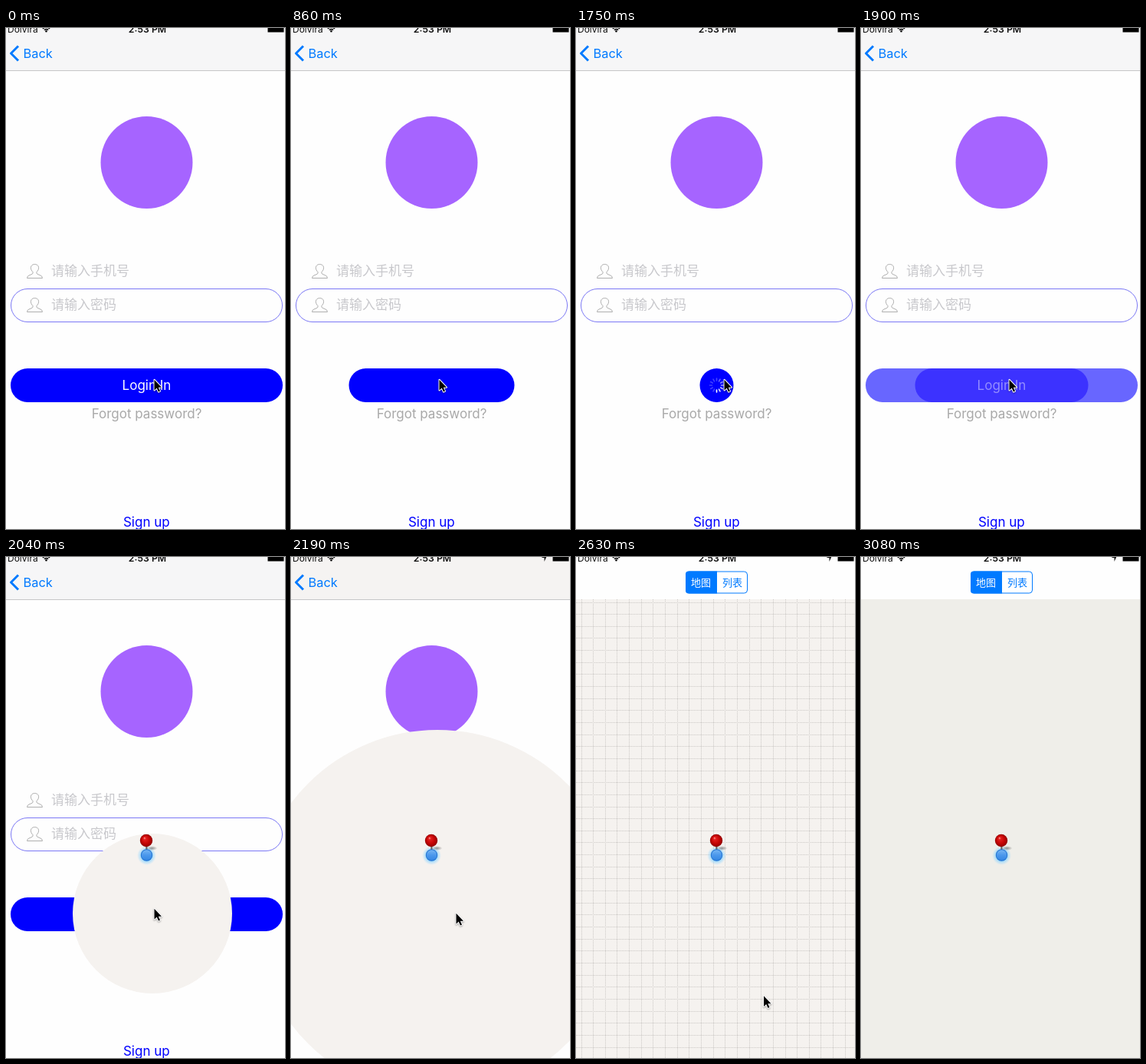
An HTML page with a canvas for the animation above (3.74 s loop, 364 px wide and 652 px high).

```html
<!DOCTYPE html>
<html lang="en">
<head>
<meta charset="utf-8">
<title>Login transition</title>
<style>
html, body { margin: 0; width: 100%; height: 100%; overflow: hidden; background: #fefefe; }
canvas { display: block; width: 364px; height: 652px; }
</style>
</head>
<body>
<canvas id="stage" width="364" height="652"></canvas>
<script>
const ctx = document.getElementById('stage').getContext('2d');
const W = 364, H = 652, LOOP = 3740, NAV = 55;
const LATIN = 'Inter, sans-serif';
const CJK = '"Noto Sans CJK SC", "Noto Sans CJK", sans-serif';
const BLUE = '#007aff';
const ARROW = 'M.5 .8V14.500L3.700 11.500L6 16.500L8 15.600L5.800 10.800H10Z';
const PERSON = 'M8 11.500C4 8 4.500 1.500 10.500 1.500S17 8 13 11.500C12.500 14 14 14.500 17 15.500Q20.500 16.500 20.500 19.500H.5Q.5 16.500 4 15.500C7 14.500 8.500 14 8 11.500Z';

const TICKS = [0, 860, 1010, 1160, 1310, 1450, 1600, 1750, 1900, 2040,
  2190, 2340, 2480, 2630, 2780, 2930, 3080];
const CURSOR_PATH = [[0, 193, 457], [2190, 215, 463], [2340, 219, 469],
  [2480, 230, 519], [2630, 244.5, 570.5], [2780, 280, 627]];

function latest(list, t, key = v => v) {
  return list.filter(v => key(v) <= t).pop();
}

function text(str, x, y, size, color, { align = 'left', weight = 400, family = LATIN } = {}) {
  ctx.font = `${weight} ${size}px ${family}`;
  ctx.textAlign = align;
  ctx.fillStyle = color;
  ctx.fillText(str, x, y);
}

function rect(x, y, w, h, color) {
  ctx.fillStyle = color;
  ctx.fillRect(x, y, w, h);
}

function disc(x, y, r, fill) {
  ctx.beginPath();
  ctx.arc(x, y, r, 0, 7);
  ctx.fillStyle = fill;
  ctx.fill();
}

function pill(x, y, w, h, r) {
  ctx.beginPath();
  ctx.roundRect(x, y, w, h, r);
}

function shape(d, x, y, { fill, stroke, width = 1 }) {
  const path = new Path2D(d);
  ctx.save();
  ctx.translate(x, y);
  ctx.lineWidth = width;
  ctx.lineJoin = 'round';
  if (stroke) { ctx.strokeStyle = stroke; ctx.stroke(path); }
  if (fill) { ctx.fillStyle = fill; ctx.fill(path); }
  ctx.restore();
}

function glow(x, y, r, stops, cx = x, cy = y) {
  const g = ctx.createRadialGradient(cx, cy, 0, x, y, r);
  stops.forEach(([at, color]) => g.addColorStop(at, color));
  disc(x, y, r, g);
}

function statusBar(t) {
  text('Dolvira', 2, 6, 12, '#111');
  text('2:53 PM', 184.5, 6, 12.3, '#111', { align: 'center', weight: 600 });
  ctx.strokeStyle = '#111';
  ctx.lineWidth = 1.6;
  for (const r of [3.4, 6]) {
    ctx.beginPath();
    ctx.arc(52.5, 5, r, -Math.PI * 0.77, -Math.PI * 0.23);
    ctx.stroke();
  }
  disc(52.5, 4.2, 1.3, '#111');
  rect(341.5, 0, 21, 5.5, '#000');
  if (t >= 2190) shape('M8-3L0 1H4V6Z', 326.5, 0, { fill: '#111' });
}

function navBar(t) {
  if (t >= 2480) {
    rect(0, 0, W, NAV, '#fefefe');
    pill(143.5, 19, 80, 28, 4);
    ctx.fillStyle = '#fff';
    ctx.fill();
    ctx.strokeStyle = BLUE;
    ctx.lineWidth = 1;
    ctx.stroke();
    pill(143, 18.5, 41, 29, [4, 0, 0, 4]);
    ctx.fillStyle = BLUE;
    ctx.fill();
    text('地图', 163, 38, 13, '#fff', { align: 'center', family: CJK });
    text('列表', 204, 38, 13, BLUE, { align: 'center', family: CJK });
  } else {
    rect(0, 0, W, NAV, t >= 2190 ? '#f5f3f2' : '#f6f6f7');
    rect(0, NAV, W, 1, '#c6c6c8');
    shape('M11 1L1.5 10.5L11 20', 5, 22.5, { stroke: BLUE, width: 3 });
    text('Back', 22.5, 39, 16.4, BLUE);
  }
  statusBar(t);
}

function field(y, placeholder) {
  shape(PERSON, 27, y - 10, { stroke: '#a6a6a6', width: 0.9 });
  text(placeholder, 59, y + 6, 17, '#c8c8cc', { family: CJK, weight: 300 });
}

function spinner(t) {
  const head = Math.floor(6 + (t - 1750) / (1000 / 12));
  ctx.lineWidth = 1.6;
  ctx.lineCap = 'round';
  for (let i = 0; i < 12; i++) {
    const lag = ((head - i) % 12 + 12) % 12;
    ctx.save();
    ctx.translate(183.5, 465);
    ctx.rotate(i * Math.PI / 6);
    ctx.strokeStyle = `rgba(255,255,255,${Math.max(0.25, 1 - lag * 0.12)})`;
    ctx.beginPath();
    ctx.moveTo(0, -6);
    ctx.lineTo(0, -9);
    ctx.stroke();
    ctx.restore();
  }
  ctx.lineCap = 'butt';
}

function button(t) {
  const bar = (width, color) => {
    pill(183.5 - width / 2, 443, width, 44, 22);
    ctx.fillStyle = color;
    ctx.fill();
  };
  const label = color => text('Login In', 183.5, 471, 17, color, { align: 'center' });
  if (t < 860 || t >= 2040) {
    bar(355, '#00f');
    label('#fff');
  } else if (t >= 1900) {
    bar(355, '#6866ff');
    bar(226, '#3c32ff');
    label('#938dff');
  } else {
    bar(t < 1010 ? 216 : 44, '#00f');
    if (t >= 1010) spinner(t);
  }
}

function loginScreen(t) {
  rect(0, 0, W, H, '#fefefe');
  disc(183.5, 175, 60, '#a664ff');
  field(316, '请输入手机号');
  field(360, '请输入密码');
  pill(6.5, 339.5, 354, 43, 21.5);
  ctx.strokeStyle = '#7b78f5';
  ctx.lineWidth = 1;
  ctx.stroke();
  button(t);
  text('Forgot password?', 183.5, 508, 17, '#a9a9a9', { align: 'center' });
  text('Sign up', 183.3, 649, 17, '#00f', { align: 'center' });
}

function grid() {
  const step = 15.65;
  ctx.strokeStyle = '#cbc8c5';
  ctx.lineWidth = 1;
  ctx.setLineDash([1, 1]);
  ctx.beginPath();
  for (let x = 7; x < W; x += step) {
    ctx.moveTo(Math.floor(x) + 0.5, NAV);
    ctx.lineTo(Math.floor(x) + 0.5, H);
  }
  for (let y = 59; y < H; y += step) {
    ctx.moveTo(0, Math.floor(y) + 0.5);
    ctx.lineTo(W, Math.floor(y) + 0.5);
  }
  ctx.stroke();
  ctx.setLineDash([]);
}

function pin() {
  glow(183.5, 388.5, 12.5, [[0, '#6cc8ff'], [0.55, 'rgba(120,205,255,.75)'], [1, 'rgba(150,215,255,0)']]);
  ctx.save();
  ctx.translate(190.5, 379);
  ctx.scale(1, 0.42);
  glow(0, 0, 7, [[0, 'rgba(80,80,80,.6)'], [1, 'rgba(80,80,80,0)']]);
  ctx.restore();
  rect(182.3, 375, 2.2, 7, '#666');
  const blue = ctx.createLinearGradient(0, 380, 0, 396);
  blue.addColorStop(0, '#7db9f4');
  blue.addColorStop(0.5, '#4b98ec');
  blue.addColorStop(1, '#3183e2');
  disc(183.5, 388, 7.7, '#1f70d0');
  disc(183.5, 388, 6.8, blue);
  glow(183, 369, 8.2, [[0, '#ff9a90'], [0.22, '#e01c1c'], [0.65, '#c40404'], [1, '#900000']], 180.5, 365.5);
}

function mapScreen(t) {
  ctx.save();
  if (t < 2480) {
    ctx.beginPath();
    ctx.arc(191, 464, 239 + (t - 2190) * 0.9, 0, 7);
    ctx.clip();
  }
  rect(0, 0, W, H, t >= 3080 ? '#efeee9' : '#f5f2ef');
  if (t >= 2630 && t < 3080) grid();
  pin();
  ctx.restore();
}

function cursor(t) {
  if (t >= 2930) return;
  const [, x, y] = latest(CURSOR_PATH, t, p => p[0]);
  ctx.save();
  ctx.shadowColor = 'rgba(0,0,0,.35)';
  ctx.shadowBlur = 2;
  ctx.shadowOffsetY = 1;
  shape(ARROW, x, y, { stroke: '#fff', width: 2 });
  ctx.restore();
  shape(ARROW, x, y, { fill: '#000' });
}

function draw() {
  const t = latest(TICKS, performance.now() % LOOP);
  if (t < 2480) loginScreen(t);
  if (t >= 2040) mapScreen(t);
  navBar(t);
  cursor(t);
  requestAnimationFrame(draw);
}
draw();
</script>
</body>
</html>
```
